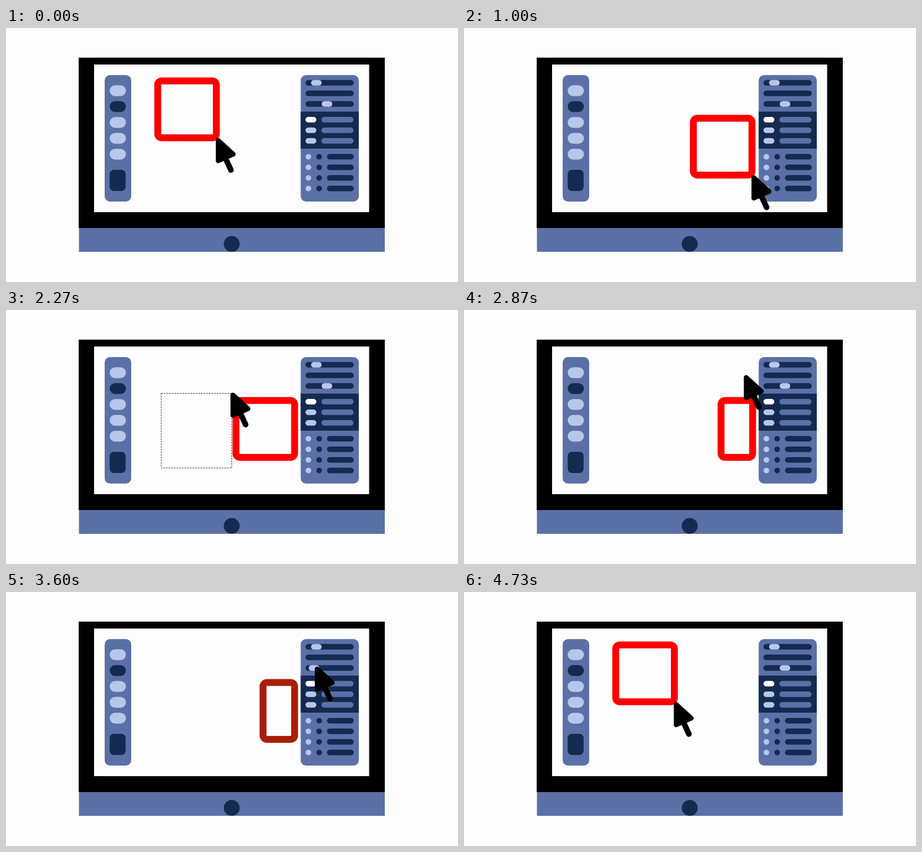
An HTML page with a canvas for the animation above (4.99 s loop, 852 by 480 pixels).

```html
<!DOCTYPE html>
<html lang="en">
<head>
<meta charset="utf-8">
<title>Drawing on a screen</title>
<style>
html, body { margin: 0; width: 100%; height: 100%; overflow: hidden; background: #fdfdfe; }
canvas { display: block; }
</style>
</head>
<body>
<canvas id="stage" width="852" height="480"></canvas>
<script>
const ctx = document.getElementById('stage').getContext('2d');
const LOOP = 4990, FPS = 15;
const PAPER = '#fdfdfe', BLUE = '#5b70a6', NAVY = '#142a50', PALE = '#b9c6ec';

const mix = (a, b, p) => a + (b - a) * p;
const mixPoint = (a, b, p) => a.map((v, i) => mix(v, b[i], p));
const span = (f, from, to) => Math.min(1, Math.max(0, (f - from) / (to - from)));
const inOut = t => t < .5 ? 2 * t * t : 1 - 2 * (1 - t) ** 2;
const easeOut = t => 1 - (1 - t) ** 2;
const ease = (f, from, to) => inOut(span(f, from, to));

function box(x, y, w, h, r, color) {
  ctx.fillStyle = color;
  ctx.beginPath();
  ctx.roundRect(x, y, w, h, r);
  ctx.fill();
}
// Horizontal bar with round ends, centred on y
const bar = (x, y, w, color, h = 10.6) => box(x, y - h / 2, w, h, h / 2, color);

function drawMonitor(knob) {
  box(0, 0, 852, 480, 0, PAPER);
  box(137, 56, 577, 322, 0, '#000');
  box(166, 69, 518.5, 279, 0, PAPER);
  box(137.5, 378, 576.5, 45, 0, BLUE);
  bar(410.5, 408, 30, NAVY, 30);

  box(186, 89, 50, 239, 10, BLUE);
  for (let i = 0; i < 5; i++) bar(195.5, 118.5 + 30 * i, 30.5, i === 1 ? NAVY : PALE, 20.5);
  box(195.5, 268, 30, 40, 8, NAVY);

  box(555.5, 89, 109.5, 239, 10, BLUE);
  box(555.5, 158, 109.5, 70, 0, NAVY);
  for (let i = 0; i < 3; i++) {
    bar(564.5, 103.5 + 20 * i, 91, NAVY);
    bar(564.5, 173.3 + 20 * i, 20.5, i ? PALE : '#fff');
    bar(594.5, 173.3 + 20 * i, 60.5, BLUE);
  }
  bar(575, 103.5, 20, PALE);
  bar(595 + knob, 143.5, 20, PALE);
  for (let i = 0; i < 4; i++) {
    const y = 243.3 + 20 * i;
    bar(564.7, y, 10.6, PALE);
    bar(585, y, 10.6, NAVY);
    bar(605, y, 50.5, NAVY);
  }
}

function drawFrame(right, bottom, width, color) {
  ctx.strokeStyle = color;
  ctx.lineWidth = 13;
  ctx.beginPath();
  ctx.roundRect(right - width + 6.5, bottom - 114, width - 13, 107.5, 7.5);
  ctx.stroke();
}

function drawMarquee(from, to) {
  const snap = v => Math.floor(v) + .5;
  const [x, y] = from.map(snap), [x2, y2] = to.map(snap);
  ctx.strokeStyle = '#222';
  ctx.lineWidth = 1;
  ctx.setLineDash([3, 2]);
  ctx.strokeRect(x, y2, x2 - x, y - y2);
  ctx.setLineDash([]);
}

function drawCursor([x, y]) {
  ctx.save();
  ctx.translate(x, y);
  ctx.fillStyle = ctx.strokeStyle = '#000';
  ctx.lineJoin = ctx.lineCap = 'round';
  ctx.lineWidth = 9;
  ctx.beginPath();
  ctx.moveTo(4, 4.5);
  ctx.lineTo(32.5, 30.5);
  ctx.lineTo(4, 43);
  ctx.closePath();
  ctx.fill();
  ctx.stroke();
  ctx.lineWidth = 10.5;
  ctx.beginPath();
  ctx.moveTo(14, 30);
  ctx.lineTo(28, 60.5);
  ctx.stroke();
  ctx.restore();
}

const HOME = [403, 214], AWAY = [550.5, 285];
const SELECT_A = [292, 298], SELECT_B = [478, 102];
const grip = ([x, y]) => [x - 7, y - 6];
const tip = ([x, y]) => [x - 2, y - 1];

function cursorAt(f, corner, selection, knob) {
  const slider = [607 + knob, 141], passing = [528, 123];
  if (f <= 18) return grip(corner);
  if (f < 24) return mixPoint(grip(AWAY), tip(SELECT_A), ease(f, 18, 21));
  if (f <= 42) return tip(selection);
  if (f <= 43) return mixPoint(tip(SELECT_B), passing, f - 42);
  if (f < 50) return mixPoint(passing, slider, easeOut(span(f, 43, 48)));
  if (f < 57) return slider;
  if (f < 60) return mixPoint(slider, grip(AWAY), ease(f, 57, 60));
  return grip(corner);
}

function draw(f) {
  const back = ease(f, 60, 71);
  const corner = mixPoint(HOME, AWAY, ease(f, 0, 16) - back);
  const selection = mixPoint(SELECT_A, SELECT_B, ease(f, 24, 40));
  const width = f < 40 ? 123.5 : mix(72.5, 123.5, back * back);
  const slide = Math.sin(Math.PI * span(f, 50, 57));
  const knob = -25 * slide;
  const color = `rgb(${mixPoint([255, 0, 0], [166, 32, 8], slide).map(Math.round)})`;

  drawMonitor(knob);
  drawFrame(...corner, width, color);
  if (f > 24 && f < 40) drawMarquee(SELECT_A, selection);
  drawCursor(cursorAt(f, corner, selection, knob));
}

const start = performance.now();
function tick() {
  const time = (performance.now() - start) % LOOP;
  draw(Math.floor((time + 4) * FPS / 1000));
  requestAnimationFrame(tick);
}
tick();
</script>
</body>
</html>
```
